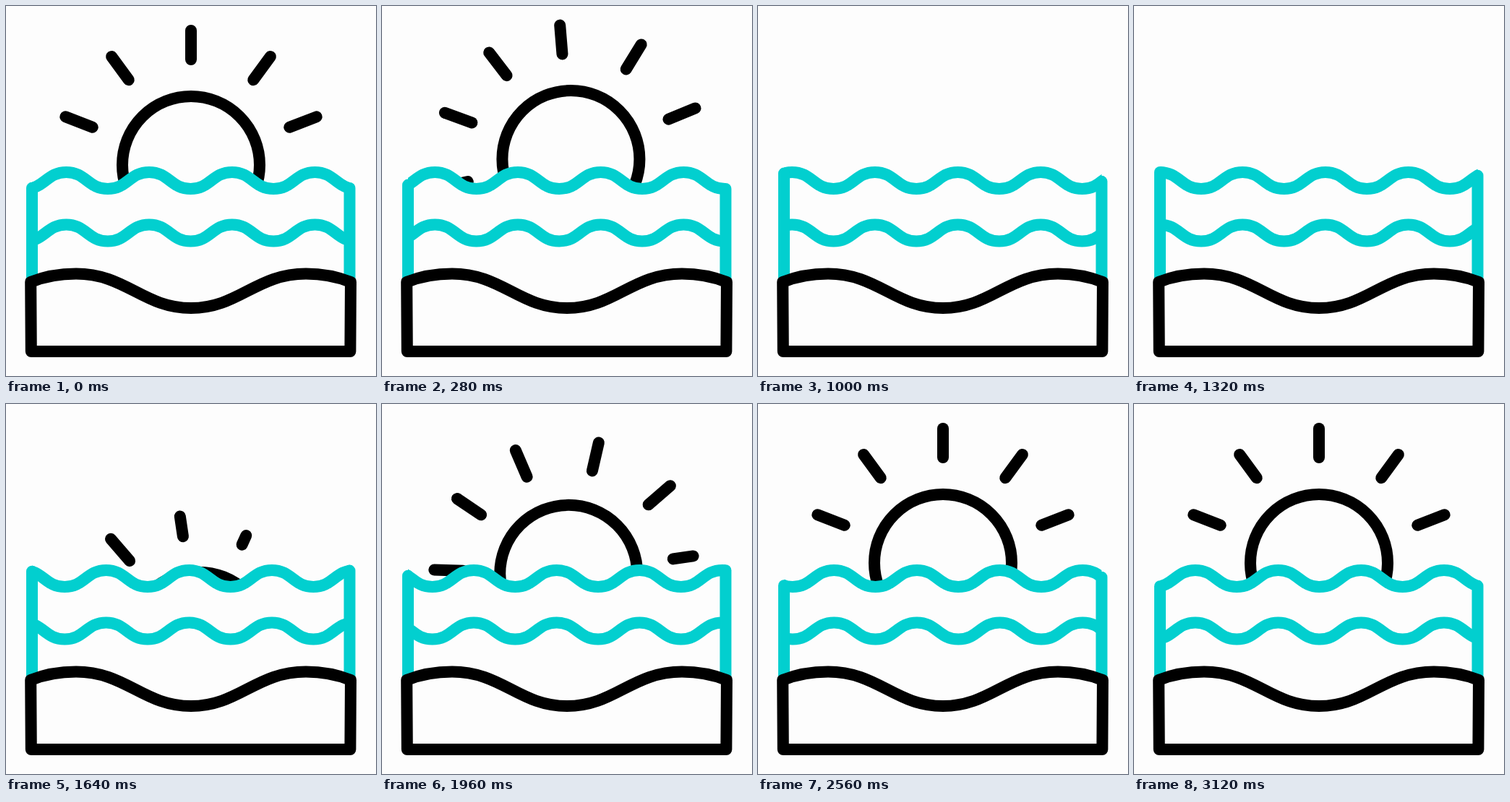
An HTML page without scripts that plays this animation: 512x512 px, repeating every 3.16 s.

```html
<!DOCTYPE html>
<html lang="en">
<head>
<meta charset="utf-8">
<title>Sunset over the sea</title>
<style>
  html, body { margin: 0; width: 100%; height: 100%; overflow: hidden; background: #fdfdfd; }
  svg { display: block; width: 100vw; height: 100vh; }
  .line { stroke-width: 16; stroke-linecap: round; stroke-linejoin: round; }
  .ink { stroke: #000; fill: none; }
  .sea { stroke: #02cfcf; fill: none; }
  .bg { fill: #fdfdfd; }
  .rays path { stroke-dasharray: 40 60; }
</style>
</head>
<body>
<svg viewBox="0 0 512 512">
  <defs>
    <clipPath id="tank"><rect x="36" y="200" width="439.5" height="200"/></clipPath>
    <path id="wave" d="M26.1 253
      c27 0 30.35-23 57.35-23s30.35 23 57.35 23
      s30.35-23 57.35-23s30.35 23 57.35 23
      s30.35-23 57.35-23s30.35 23 57.35 23
      s30.35-23 57.35-23s30.35 23 57.35 23
      s30.35-23 57.35-23s30.35 23 57.35 23"/>
    <path id="post" d="M0 0V160"/>
  </defs>

  <!-- sun: sideways drift, height, spin -->
  <g transform="translate(256 220)">
  <g>
    <animateTransform attributeName="transform" type="translate" dur="3.16s" repeatCount="indefinite" calcMode="spline"
      values="0 0;31 0;31 0;0 0;0 0" keyTimes="0;.335;.383;.7076;1"
      keySplines=".33 0 .67 1;0 0 1 1;.333 .667 .667 1;0 0 1 1"/>
  <g>
    <animateTransform attributeName="transform" type="translate" dur="3.16s" repeatCount="indefinite" calcMode="spline"
      values="0 0;0 -8;0 -3;0 228;0 367;0 0;0 0" keyTimes="0;.0886;.1646;.3165;.383;.6804;1"
      keySplines=".33 0 .67 1;.33 0 .67 .33;.33 .04 .67 .35;0 0 1 1;.333 .667 .667 1;0 0 1 1"/>
    <circle class="line ink" r="95"/>
    <g class="line ink rays">
      <animateTransform attributeName="transform" type="rotate" dur="3.16s" repeatCount="indefinite" calcMode="spline"
        values="0;180;180;0;0" keyTimes="0;.335;.383;.7076;1"
        keySplines=".33 0 .67 1;0 0 1 1;.333 .667 .667 1;0 0 1 1"/>
      <!-- rays grow back one after another -->
      <path d="M146 0h40" transform="rotate(-21)"><animate attributeName="stroke-dashoffset" dur="3.16s" repeatCount="indefinite" values="0;0;42;42;0;0" keyTimes="0;.234;.291;.566;.642;1"/></path>
      <path d="M146 0h40" transform="rotate(-53.8)"><animate attributeName="stroke-dashoffset" dur="3.16s" repeatCount="indefinite" values="0;0;42;42;0;0" keyTimes="0;.234;.291;.541;.617;1"/></path>
      <path d="M146 0h40" transform="rotate(-90)"><animate attributeName="stroke-dashoffset" dur="3.16s" repeatCount="indefinite" values="0;0;42;42;0;0" keyTimes="0;.234;.291;.516;.592;1"/></path>
      <path d="M146 0h40" transform="rotate(-126.2)"><animate attributeName="stroke-dashoffset" dur="3.16s" repeatCount="indefinite" values="0;0;42;42;0;0" keyTimes="0;.234;.291;.491;.566;1"/></path>
      <path d="M146 0h40" transform="rotate(-159)"><animate attributeName="stroke-dashoffset" dur="3.16s" repeatCount="indefinite" values="0;0;42;42;0;0" keyTimes="0;.234;.291;.465;.541;1"/></path>
      <path d="M146 0h40" transform="rotate(-191.3)"><animate attributeName="stroke-dashoffset" dur="3.16s" repeatCount="indefinite" values="0;0;42;42;0;0" keyTimes="0;.234;.291;.44;.516;1"/></path>
      <path d="M146 0h40" transform="rotate(-223.8)"><animate attributeName="stroke-dashoffset" dur="3.16s" repeatCount="indefinite" values="0;0;42;42;0;0" keyTimes="0;.234;.291;.415;.491;1"/></path>
      <path d="M146 0h40" transform="rotate(-260)"><animate attributeName="stroke-dashoffset" dur="3.16s" repeatCount="indefinite" values="0;0;42;42;0;0" keyTimes="0;.234;.291;.389;.465;1"/></path>
    </g>
  </g>
  </g>
  </g>

  <!-- water covers everything under the upper wave -->
  <rect class="bg" y="252.5" width="512" height="260"/>
  <g clip-path="url(#tank)">
    <g class="line sea">
      <animateTransform attributeName="transform" type="translate" dur="3.16s" repeatCount="indefinite" values="0 0;-114.7 0"/>
      <use href="#wave" class="bg"/>
      <use href="#wave" y="72.5"/>
    </g>
  </g>

  <!-- side walls ride on the wave height -->
  <g class="line sea">
    <g>
      <animateTransform attributeName="transform" type="translate" dur="3.16s" begin="-.268s" repeatCount="indefinite" calcMode="spline"
        values="36 253;36 230;36 253" keyTimes="0;.5;1" keySplines=".47 0 .53 1;.47 0 .53 1"/>
      <use href="#post"/>
    </g>
    <g>
      <animateTransform attributeName="transform" type="translate" dur="3.16s" begin="-2.901s" repeatCount="indefinite" calcMode="spline"
        values="475.5 253;475.5 230;475.5 253" keyTimes="0;.5;1" keySplines=".47 0 .53 1;.47 0 .53 1"/>
      <use href="#post"/>
    </g>
  </g>

  <!-- sand -->
  <path class="line bg" stroke="#000" d="M34.2 382C54 374 75 370.5 97 370.5C166 370.5 190 418 256 418S346 370.5 415 370.5C437 370.5 457 374 477 382L476.4 478H34.8Z"/>
</svg>
</body>
</html>
```
